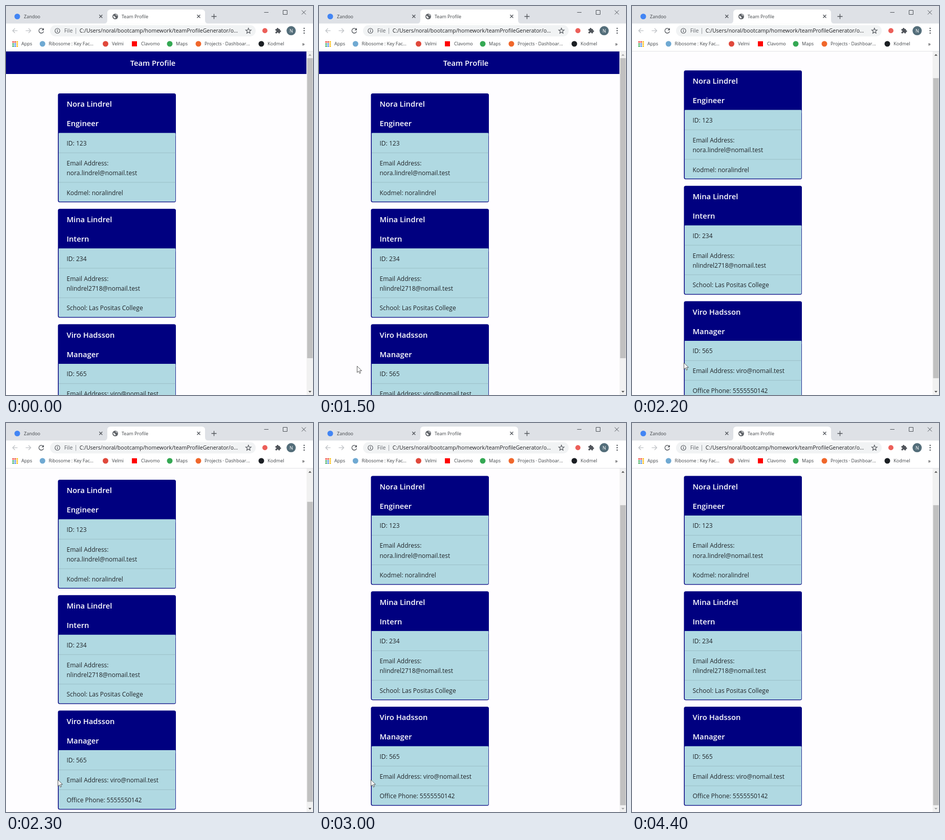
These frames come from a looping animation (600 px wide and 761 px high, 5.2 s). An HTML page:

```html
<!DOCTYPE html>
<html lang="en">
<head>
<meta charset="utf-8">
<title>Team Profile</title>
<style>
  html, body { margin: 0; width: 100%; height: 100%; overflow: hidden; background: #fefdff; }
  svg { display: block; width: 600px; height: 761px; }
  text { font-family: "Open Sans", "Noto Sans", sans-serif; white-space: pre; }
  .ui { font-size: 9px; fill: #3f4347; }
  .url { font-size: 10.5px; fill: #202124; }
  .head { font-size: 14.75px; font-weight: 600; fill: #fff; }
  .body { font-size: 12px; fill: #212529; }
  .line { fill: none; stroke: #50545a; stroke-width: 1.3; }
</style>
</head>
<body>
<svg id="stage" viewBox="0 0 600 761" xmlns="http://www.w3.org/2000/svg"></svg>
<script>
const LOOP = 5200, STEP = 100;
const NAVY = '#000080', POWDER = '#b0d9e2';
const MAX_SCROLL = 67.5;

const rect = (x, y, w, h, fill, rx = 0) =>
  `<rect x="${x}" y="${y}" width="${w}" height="${h}" rx="${rx}" fill="${fill}"/>`;
const dot = (x, y, r, fill) => `<circle cx="${x}" cy="${y}" r="${r}" fill="${fill}"/>`;
const text = (x, y, cls, str, more = '') => `<text x="${x}" y="${y}" class="${cls}" ${more}>${str}</text>`;
const line = (d, more = '') => `<path class="line" d="${d}" ${more}/>`;
const cross = (x, y, r, more) =>
  line(`M${x - r} ${y - r}l${2 * r} ${2 * r}M${x + r} ${y - r}l${-2 * r} ${2 * r}`, more);

function tabStrip() {
  const thin = 'stroke="#333" style="stroke-width:1"';
  return rect(0, 0, 600, 34.5, '#dee1e6') +
    '<path d="M191 34.5Q198 34.5 198 27.5V13.5Q198 7 204.500 7H382.500Q389 7 389 13.500V27.500Q389 34.500 396 34.500Z" fill="#fff"/>' +
    dot(22, 20.5, 5.5, '#4285f4') +
    text(35, 23.8, 'ui', 'Zandoo') + cross(185.3, 20.3, 3) +
    dot(213.5, 20.5, 5.5, '#5f6368') +
    '<path d="M209.500 19q2 0 3 1.500t2 1.500q-1 1-1 2.600q-4-1-4-5.600M214 16.300q-.5 2 1.500 2t2 2q1-2.500-3.500-4" fill="#fff"/>' +
    text(226, 23.8, 'ui', 'Team Profile') + cross(376.5, 20.3, 3) +
    line('M401.500 20.500h10M406.500 15.500v10') +
    line('M504.500 12.500h8.500', thin) + line('M541.500 8.500h8v8h-8z', thin) + cross(582, 12.5, 4, thin);
}

function star(cx, cy) {
  const pts = Array.from({ length: 10 }, (_, i) => {
    const r = i % 2 ? 2.4 : 5.6, a = i * Math.PI / 5;
    return `${(cx + r * Math.sin(a)).toFixed(2)},${(cy - r * Math.cos(a)).toFixed(2)}`;
  });
  return `<polygon class="line" style="stroke-width:1.1" points="${pts.join(' ')}"/>`;
}

function toolbar() {
  const faint = 'style="stroke:#bfc2c6"';
  return rect(0, 34.5, 600, 54.5, '#fff') +
    line('M22.500 48.300h-9M17.500 43.800l-4.500 4.500 4.500 4.500', faint) +
    line('M38.500 48.300h9.500M44 43.800l4.500 4.500-4.500 4.500', faint) +
    line('M72.500 45.300a4.700 4.700 0 1 0 1 4.300') +
    '<path d="M74 43v4.600h-4.600z" fill="#50545a"/>' +
    rect(86, 37.5, 402, 22, '#f1f3f4', 11) +
    '<circle class="line" style="stroke-width:1.1" cx="100.500" cy="48.500" r="4.700"/>' +
    line('M100.500 47.800v3.200M100.500 45.700v1.200') +
    text(113.7, 52, 'url', 'File', 'style="fill:#5f6368"') +
    rect(136, 43, 1, 11.5, '#9da1a6') +
    text(143.7, 52, 'url', 'C:/Users/noral/bootcamp/homework/teamProfileGenerator/o…') +
    star(473.8, 48.8) +
    dot(506, 48.3, 5, '#ec5f59') +
    rect(526.5, 45, 9, 8.5, '#50545a', 1) + dot(530.8, 44.5, 1.8, '#50545a') +
    dot(535.7, 49.2, 1.8, '#50545a') + dot(527, 49.3, 1.4, '#fff') + dot(531, 53.2, 1.4, '#fff') +
    dot(557.3, 48.3, 9, '#546e7a') +
    text(557.3, 51.6, 'ui', 'N', 'text-anchor="middle" style="fill:#fff"') +
    [43.7, 48.3, 52.9].map(y => dot(582.7, y, 1.25, '#50545a')).join('');
}

function bookmarks() {
  const hues = ['#ea4335', '#ea4335', '#fbbc04', '#34a853', '#4285f4', '#fbbc04', '#34a853', '#4285f4', '#fbbc04'];
  const apps = hues.map((c, i) => rect(12.5 + i % 3 * 4, 69 + (i / 3 | 0) * 4, 2.8, 2.8, c)).join('');
  const items = [
    [71.3, '#6fa9d2', 83.5, 'Ribosome : Key Fac...'],
    [194.5, '#e0483b', 207, 'Velmi'],
    [320, '#34a853', 332, 'Maps'],
    [376, '#f0672b', 388, 'Projects · Dashboar...'],
    [499, '#1b1f23', 511.3, 'Kodmel']
  ];
  return apps + text(30, 77.2, 'ui', 'Apps') +
    items.map(([x, c, tx, s]) => dot(x, 74, 5.5, c) + text(tx, 77.2, 'ui', s)).join('') +
    rect(246, 69, 10, 10, '#f00') + text(264, 77.2, 'ui', 'Clavomo') +
    text(578.5, 77.5, 'url', '»') +
    rect(0, 88, 600, 1, '#e1e2e5');
}

function card(top, name, role, id, email, last) {
  const x = 118.5;
  const drop = email.length > 1 ? 19.2 : 0;
  const height = 193.8 + drop;
  const rule = y => rect(103, top + y, 228.2, 1, '#9bbfc8');
  return rect(101.5, top, 230.5, height, NAVY, 3.5) +
    rect(103, top + 77.6, 228.2, height - 78.8, POWDER, 2) +
    rect(103, top + 77.6, 228.2, 6, POWDER) +
    text(x, top + 26.3, 'head', name) + text(x, top + 64.3, 'head', role) +
    text(x, top + 101.7, 'body', 'ID: ' + id) + rule(115.7) +
    email.map((s, i) => text(x, top + 140.7 + 19.3 * i, 'body', s)).join('') +
    rule(154.3 + drop) + text(x, top + 179.4 + drop, 'body', last);
}

function page() {
  return rect(0, 89, 587.5, 44, NAVY) +
    text(287, 117, 'head', 'Team Profile', 'text-anchor="middle"') +
    card(171, 'Nora Lindrel', 'Engineer', 123,
      ['Email Address:', 'nora.lindrel@nomail.test'], 'Kodmel: noralindrel') +
    card(396.8, 'Mina Lindrel', 'Intern', 234,
      ['Email Address:', 'nlindrel2718@nomail.test'], 'School: Las Positas College') +
    card(622.5, 'Viro Hadsson', 'Manager', 565,
      ['Email Address: viro@nomail.test'], 'Office Phone: 5555550142');
}

const stage = document.getElementById('stage');
stage.innerHTML =
  '<clipPath id="view"><rect x="0" y="89" width="587.5" height="672"/></clipPath>' +
  rect(0, 0, 600, 761, '#fefdff') +
  `<g clip-path="url(#view)"><g id="page">${page()}</g></g>` +
  rect(587.5, 89, 12.5, 672, '#f1f1f1') +
  '<rect id="thumb" x="588.5" y="102" width="11" height="587" fill="#c1c1c1"/>' +
  '<path id="up" d="M591 97.300l3-3.300 3 3.300z"/><path id="down" d="M591 753l3 3.300 3-3.300z"/>' +
  tabStrip() + toolbar() + bookmarks() +
  '<path id="cursor" d="M0 0V12.500L2.900 9.800L4.900 14.300L6.900 13.400L5 9.100H9Z" fill="#fff" stroke="#333" stroke-width=".8"/>';

const [pageEl, thumb, up, down, cursor] =
  ['page', 'thumb', 'up', 'down', 'cursor'].map(id => document.getElementById(id));

// The wheel burst runs fast, then coasts to the bottom.
const BURST = [20.5, 45, 60, 63, 64.5, 65.3, 66, 66.6, 67.1];
function scrollAt(t) {
  if (t < 2100) return 0;
  return BURST[(t - 2100) / STEP] ?? MAX_SCROLL;
}

function draw(now) {
  const t = Math.floor(now % LOOP / STEP) * STEP;
  const s = scrollAt(t);
  pageEl.setAttribute('transform', `translate(0 ${-s})`);
  thumb.setAttribute('y', 102 + s * 0.87);
  up.setAttribute('fill', s > 0 ? '#505050' : '#a3a3a3');
  down.setAttribute('fill', s < MAX_SCROLL ? '#505050' : '#a3a3a3');

  const k = Math.min(1, Math.max(0, (t - 1500) / 200));
  cursor.setAttribute('transform', `translate(${74.5 + 27 * k} ${704.5 - 6.5 * k})`);
  cursor.setAttribute('visibility', t >= 1500 && t < 3200 ? 'visible' : 'hidden');
}

const start = performance.now();
function tick() {
  draw(performance.now() - start);
  requestAnimationFrame(tick);
}
draw(0);
requestAnimationFrame(tick);
</script>
</body>
</html>
```
